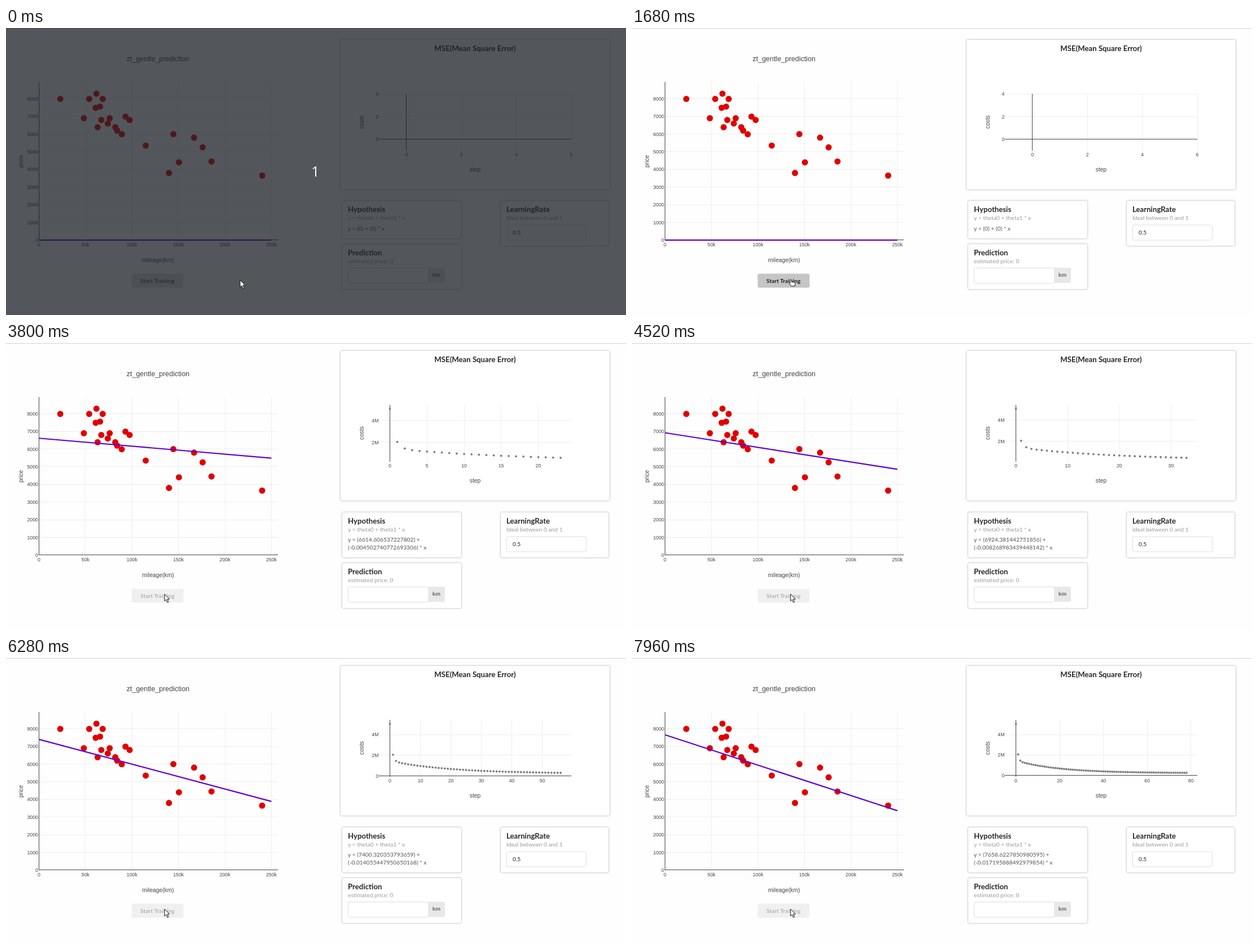
Recreate the animation shown at these times as an HTML page. Size 1099x510 px, loop 8000 ms.

```html
<!DOCTYPE html>
<html lang="en">
<head>
<meta charset="utf-8">
<title>Regression training</title>
<style>
  html, body { margin: 0; width: 100%; height: 100%; overflow: hidden; background: #fefefe; }
  svg { display: block; width: 1099px; height: 510px; }
  text { font: 10.26px Lato, sans-serif; fill: rgba(0,0,0,.68); white-space: pre; }
  .head { font-size: 13.19px; font-weight: 700; fill: rgba(0,0,0,.85); }
  .meta { fill: rgba(0,0,0,.4); }
  .ink { fill: rgba(0,0,0,.87); }
  .bold { font-weight: 700; fill: rgba(0,0,0,.6); }
  .tick, .axis, .title { font-family: "Liberation Sans", Arial, sans-serif; fill: #444; }
  .tick { font-size: 8.79px; }
  .title { font-size: 12.46px; }
  .count { font: 25px "Open Sans", "Noto Sans", sans-serif; fill: #fff; }
  .card { fill: #fff; stroke: #d8d8d9; filter: drop-shadow(0 .7px .9px #d4d4d5); }
  .field { fill: #fff; stroke: #dedede; }
  .grid { stroke: #eee; }
  .zero { stroke: #444; }
</style>
</head>
<body>
<svg id="stage" viewBox="0 0 1099 510"></svg>
<script>
const LOOP = 8000, RATE = 0.5;

// mileage (km), price
const cars = [
  [240000, 3650], [139800, 3800], [150500, 4400], [185530, 4450], [176000, 5250], [114800, 5350],
  [166800, 5800], [89000, 5990], [144500, 5999], [84000, 6200], [82029, 6390], [63060, 6390],
  [74000, 6600], [97500, 6800], [67000, 6800], [76025, 6900], [48235, 6900], [93000, 6990],
  [60949, 7490], [65674, 7555], [54000, 7990], [68500, 7990], [22899, 7990], [61789, 8290]
];

// bursts of redraws: start, end, count
const bursts = [
  [1920, 2720, 12], [2800, 3600, 12], [3660, 4460, 12], [4520, 5320, 11],
  [5400, 6140, 11], [6220, 6960, 11], [7040, 7820, 11], [7900, 7960, 2]
];
const WARMUP = 3; // redraws spent on disabling the button
const ticksAt = bursts.flatMap(([a, b, n]) =>
  Array.from({ length: n }, (_, i) => Math.floor((a + (b - a) * i / (n - 1) + 4) / 20) * 20));

// gradient descent on min-max scaled mileage
function train(count) {
  const kms = cars.map(c => c[0]);
  const min = Math.min(...kms), range = Math.max(...kms) - min, m = cars.length;
  const xs = kms.map(k => (k - min) / range);
  const out = [{ a: 0, b: 0 }];
  let a = 0, b = 0;
  const errors = () => cars.map((c, i) => a + b * xs[i] - c[1]);
  for (let s = 0; s < count; s++) {
    const e = errors();
    a -= RATE * e.reduce((t, v) => t + v, 0) / m;
    b -= RATE * e.reduce((t, v, i) => t + v * xs[i], 0) / m;
    const cost = errors().reduce((t, v) => t + v * v, 0) / (2 * m);
    out.push({ a, b: b / range, cost });
  }
  return out;
}
const model = train(ticksAt.length - WARMUP);
const costs = model.slice(1).map(s => s.cost);

const text = (x, y, str, cls = '', anchor = 'start', more = '') =>
  `<text x="${x}" y="${y}" class="${cls}" text-anchor="${anchor}" ${more}>${str}</text>`;
const line = (x1, y1, x2, y2, cls) =>
  `<line x1="${x1}" y1="${y1}" x2="${x2}" y2="${y2}" class="${cls}"/>`;
const box = (x, y, w, h, cls, r = 3) =>
  `<rect x="${x}" y="${y}" width="${w}" height="${h}" rx="${r}" class="${cls}"/>`;
const dot = (x, y, r, fill) => `<circle cx="${x}" cy="${y}" r="${r}" fill="${fill}"/>`;
const upright = (x, y, str) => text(x, y, str, 'axis', 'middle', `transform="rotate(-90 ${x} ${y})"`);
const snap = v => Math.floor(v) + 0.5;
const mix = (p, q, k) => p + (q - p) * k;

function scatter({ a, b }) {
  const px = km => 58.5 + km * 1.648e-3, py = price => 376.8 - price * 0.03138;
  let s = text(269.5, 59, 'zt_gentle_prediction', 'title', 'middle');
  for (let k = 0; k <= 250; k += 50) {
    const x = snap(px(k * 1000));
    if (k) s += line(x, 96, x, 377, 'grid');
    s += text(px(k * 1000), 388, k ? k + 'k' : '0', 'tick', 'middle');
  }
  for (let p = 0; p <= 8000; p += 1000) {
    const y = snap(py(p));
    if (p) s += line(58, y, 482, y, 'grid');
    s += text(57, py(p) + 3.2, p, 'tick', 'end');
  }
  s += line(58.5, 96, 58.5, 377, 'zero') + line(58, 376.5, 482, 376.5, 'zero');
  s += cars.map(c => dot(px(c[0]).toFixed(2), py(c[1]).toFixed(2), 5.5, '#e00000')).join('');
  s += `<line x1="58.5" y1="${py(a)}" x2="470.5" y2="${py(a + b * 250000)}" stroke="#6200d0" stroke-width="2.2"/>`;
  return s + text(269.5, 416, 'mileage(km)', 'axis', 'middle') + upright(30, 237, 'price');
}

function niceStep(rough) {
  const base = 10 ** Math.floor(Math.log10(rough));
  return base * [2, 5, 10].find(k => rough / base <= k);
}
function ticks(lo, hi, parts) {
  const d = niceStep((hi - lo) / parts), list = [];
  for (let i = Math.ceil(lo / d - 1e-6); i * d <= hi + d * 1e-6; i++) list.push(i * d);
  return { d, list };
}
function label(v, d) {
  if (!v) return '0';
  if (Math.abs(v) < 1e6) return String(+v.toFixed(2)).replace('-', '\u2212');
  return (v / 1e6).toFixed(Math.max(0, -Math.floor(Math.log10(d / 1e6)))) + 'M';
}

function costChart(n) {
  const L = 661, R = 1002, T = n ? 110 : 117, B = T + 101;
  let x0 = -1, x1 = n ? 1 : 6, y0 = -1, y1 = 4;
  if (n === 1) { y0 = costs[0] - 1; y1 = costs[0] + 1; }
  if (n > 1) {
    // markers keep a fixed pixel margin inside the plot
    const ux = (n - 1) / 302.5, uy = (costs[0] - costs[n - 1]) / 87;
    x0 = -19.5 * ux; x1 = x0 + 341 * ux;
    y1 = costs[0] + 7 * uy; y0 = y1 - 101 * uy;
  }
  const px = v => L + (v - x0) / (x1 - x0) * (R - L);
  const py = v => B - (v - y0) / (y1 - y0) * (B - T);
  const tx = ticks(x0, x1, 6.6), ty = ticks(y0, y1, 4.8);
  let s = '', zero = '';
  for (const v of tx.list) {
    const x = snap(px(v));
    if (v) s += line(x, T, x, B, 'grid'); else zero += line(x, T, x, B, 'zero');
    s += text(px(v), B + 9.5, label(v, tx.d), 'tick', 'middle');
  }
  for (const v of ty.list) {
    const y = snap(py(v));
    if (v) s += line(L, y, R, y, 'grid'); else zero += line(L, y, R, y, 'zero');
    s += text(660.5, py(v) + 3.2, label(v, ty.d), 'tick', 'end');
  }
  s += zero;
  for (let i = 0; i < n; i++) s += dot(px(i).toFixed(2), py(costs[i]).toFixed(2), 1.9, '#7c7c7c');
  return s + text(831.5, T + 138, 'step', 'axis', 'middle') + upright(634, T + 50, 'costs');
}

function panels(n) {
  const up = n ? -7 : 0, mid = n ? -6 : 0, low = n ? 7 : 0, { a, b } = model[n];
  let s = box(592.5, 20.5 + up, 478, 267, 'card');
  s += text(831.5, 41 + up, 'MSE(Mean Square Error)', 'head', 'middle') + costChart(n);

  s += box(595.5, 306.5 + mid, 212, n ? 81 : 68, 'card');
  s += text(606, 327 + mid, 'Hypothesis', 'head');
  s += text(606, 341 + mid, 'y = theta0 + theta1 * x', 'meta');
  if (n) s += text(606, 353, `y = (${a}) +`) + text(606, 367, `(${b}) * x`);
  else s += text(606, 360, 'y = (0) + (0) * x');

  s += box(595.5, 383.5 + low, 212, 81, 'card');
  s += text(606, 404 + low, 'Prediction', 'head');
  s += text(606, 418 + low, 'estimated price: 0', 'meta');
  s += box(606.5, 426.5 + low, 142, 27, 'field');
  s += `<path d="M748 ${426 + low}h27q3 0 3 3v21q0 3 -3 3h-27z" fill="#e8e8e8"/>`;
  s += text(763, 442 + low, 'km', 'bold', 'middle');

  s += box(876.5, 306.5 + mid, 192, 81, 'card');
  s += text(887, 327 + mid, 'LearningRate', 'head');
  s += text(887, 341 + mid, 'Ideal between 0 and 1', 'meta');
  s += box(887.5, 350 + mid, 141, 27, 'field');
  return s + text(898, 367 + mid, '0.5', 'ink');
}

function button(hover, press, off) {
  const shade = off ? 225 : hover ? mix(202, 186, press / 3) : 225;
  const ink = off ? 0.6 : hover ? mix(0.8, 0.9, press / 3) : 0.6;
  const alpha = [1, 0.8, 0.6, 0.45][off];
  return `<g opacity="${alpha}"><rect x="222.7" y="436.5" width="92" height="25" rx="3"
    fill="rgb(${shade},${shade},${shade})"/>` +
    text(268.5, 452.5, 'Start Training', 'bold', 'middle', `style="fill:rgba(0,0,0,${ink})"`) + '</g>';
}

const ARROW = 'M0 0V12.6L2.8 9.9L5 15L7.1 14.1L4.9 9.2H8.8Z';
const HAND = 'M3 .6c1 0 1.4.6 1.4 1.4V5l5 .9c1 .2 1.4.8 1.3 1.8l-.6 5H4L.6 8.6c-.6-.9.3-1.8 1.2-1.2V2c0-.8.4-1.4 1.2-1.4z';
function cursor(x, y, hand) {
  return `<path transform="translate(${hand ? x - 2.5 : x} ${y})" d="${hand ? HAND : ARROW}"
    fill="#fff" stroke="#111" stroke-linejoin="round"/>`;
}

function countdown() {
  return '<rect width="1099" height="510" fill="rgb(30,34,39)" fill-opacity=".76"/>' +
    text(548.5, 264, '1', 'count', 'middle');
}

function stateAt(t) {
  const redraws = ticksAt.filter(v => v <= t).length;
  return {
    veil: t < 40,
    move: t < 820 ? 0 : Math.min(9, Math.floor((t - 820) / 65) + 1),
    press: [1680, 1700, 1740].filter(v => v <= t).length,
    off: Math.min(WARMUP, redraws),
    n: Math.max(0, redraws - WARMUP)
  };
}

function draw({ veil, move, press, off, n }) {
  const p = move / 9, k = p * p * (3 - 2 * p);
  const x = mix(415, 281, k), y = mix(448, 446, k);
  const hover = x < 314;
  return '<rect width="1099" height="510" fill="#fefefe"/>' +
    '<rect width="1099" height="1" fill="#dedede"/><rect y="1" width="1099" height="1" fill="#f1f1f1"/>' +
    scatter(model[n]) + panels(n) + button(hover, press, off) +
    (veil ? countdown() : '') + cursor(x, y, hover && !off);
}

const stage = document.getElementById('stage');
const start = performance.now();
let shown = '';
function tick() {
  const state = stateAt((performance.now() - start) % LOOP);
  const key = Object.values(state).join();
  if (key !== shown) {
    stage.innerHTML = draw(state);
    shown = key;
  }
  requestAnimationFrame(tick);
}
tick();
</script>
</body>
</html>
```
